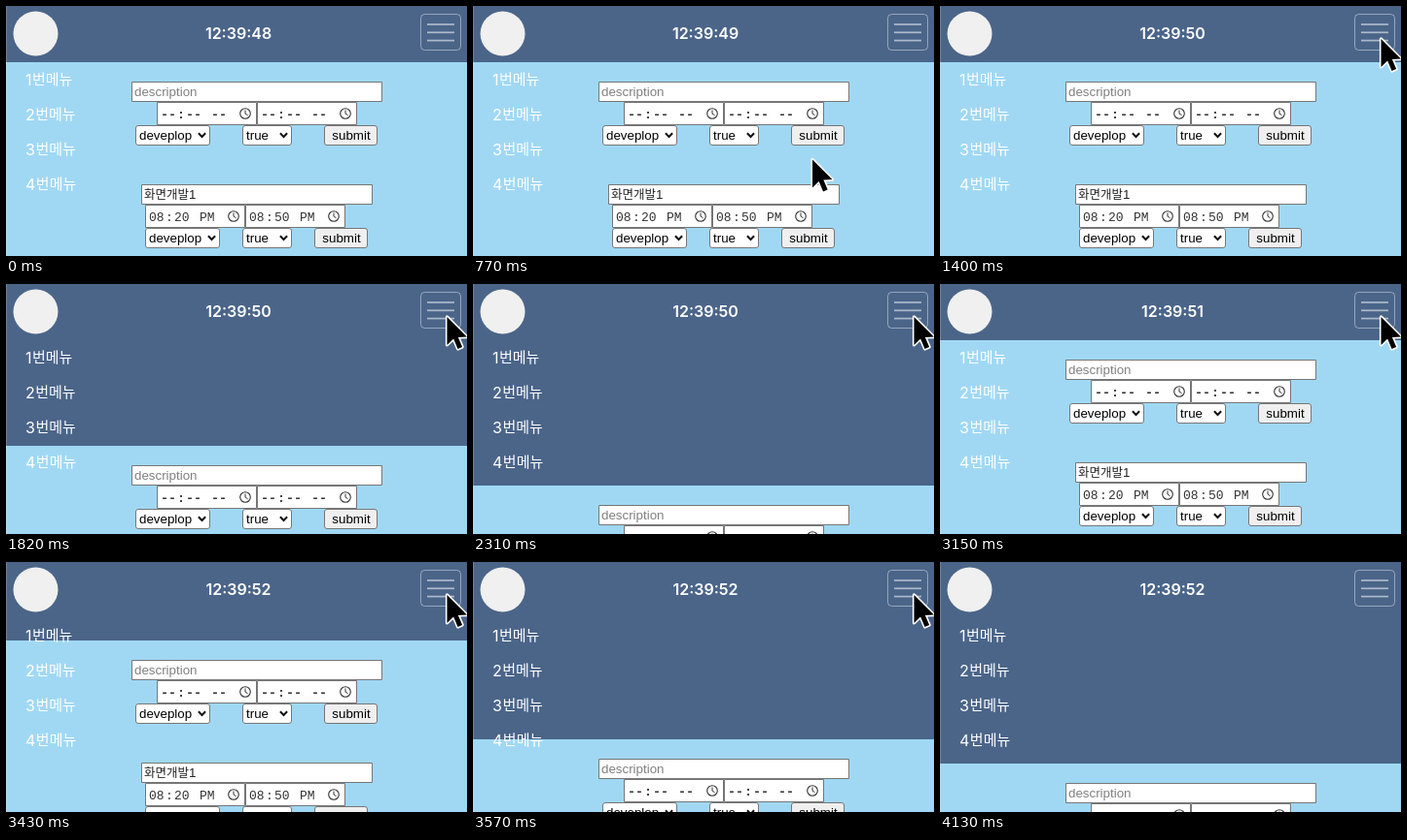
Recreate the animation shown at these times as an HTML page with a canvas. Size 474 by 258 pixels, loop 4410 ms.

```html
<!DOCTYPE html>
<html lang="ko">
<head>
<meta charset="utf-8">
<title>Menu toggle</title>
<style>
html, body { margin: 0; width: 100%; height: 100%; overflow: hidden; background: #a0d8f4; }
canvas { display: block; }
</style>
</head>
<body>
<canvas id="stage" width="474" height="258"></canvas>
<script>
const ctx = document.getElementById('stage').getContext('2d');
const W = 474, H = 258, LOOP = 4410, TICK = 70;
const BAR = 58, MENU = 150, SLIDE = 350;

const ARIAL = '13.33px "Liberation Sans", Arial, sans-serif';
const MONO = '"Liberation Mono", monospace';
const HANGUL = '"Noto Sans CJK KR", "Noto Sans CJK", sans-serif';
const LATIN = 'Inter, sans-serif';

// start time of each slide, and the openness it leads to
const SLIDES = [[1668, 1], [2545, 0], [3383, 1]];
const SECONDS = [350, 1400, 2380, 3360];
const PATH = [
  [560, 307, 241], [840, 363, 131], [1050, 397, 67],
  [1260, 453.5, 34], [3920, 453.5, 34], [4060, 473, 51]
];

// cubic-bezier(.25, .1, .25, 1)
function ease(x) {
  if (x <= 0) return 0;
  if (x >= 1) return 1;
  let lo = 0, hi = 1, u = 0.5;
  for (let i = 0; i < 24; i++) {
    u = (lo + hi) / 2;
    const bx = 0.75 * u * (1 - u) + u ** 3;
    if (bx < x) lo = u; else hi = u;
  }
  return 0.3 * u * (1 - u) ** 2 + 3 * u * u * (1 - u) + u ** 3;
}

function openness(t) {
  let open = 0;
  for (const [start, goal] of SLIDES) {
    open += (goal - open) * ease((t - start) / SLIDE);
  }
  return open;
}

function pointer(t) {
  if (t < PATH[0][0] || t > PATH[PATH.length - 1][0]) return null;
  for (let i = 1; i < PATH.length; i++) {
    const [t0, x0, y0] = PATH[i - 1], [t1, x1, y1] = PATH[i];
    if (t <= t1) {
      const k = (t - t0) / (t1 - t0);
      return [x0 + (x1 - x0) * k, y0 + (y1 - y0) * k];
    }
  }
}

function text(str, x, y, font, color = '#000', align = 'left') {
  ctx.font = font;
  ctx.fillStyle = color;
  ctx.textAlign = align;
  ctx.fillText(str, x, y);
}

function box(x, y, w, h, radius = 0, fill = '#fff', stroke = '#767676') {
  ctx.beginPath();
  ctx.roundRect(x + 0.5, y + 0.5, w - 1, h - 1, radius);
  ctx.fillStyle = fill;
  ctx.fill();
  ctx.strokeStyle = stroke;
  ctx.lineWidth = 1;
  ctx.stroke();
}

function line(points, width, color) {
  ctx.beginPath();
  points.forEach(([x, y]) => ctx.lineTo(x, y));
  ctx.lineWidth = width;
  ctx.strokeStyle = color;
  ctx.stroke();
}

function timeField(x, y, [hour, minute, half], style) {
  box(x, y, 103, 24);
  const font = style + ' ' + MONO, base = y + 16.5, ink = '#333';
  text(hour, x + 4, base, font, ink);
  text(':', x + 21, base, font, ink);
  text(minute, x + 30, base, font, ink);
  text(half, x + 56, base, font, ink);
  const cx = x + 91, cy = y + 12;
  ctx.beginPath();
  ctx.arc(cx, cy, 5.3, 0, Math.PI * 2);
  ctx.lineWidth = 1.1;
  ctx.strokeStyle = ink;
  ctx.stroke();
  line([[cx, cy - 3.5], [cx, cy], [cx + 2.6, cy + 1.8]], 1, ink);
}

function select(x, y, w, label) {
  box(x, y, w, 21, 2.5);
  text(label, x + 4, y + 15, ARIAL);
  const cx = x + w - 8.5, cy = y + 10;
  line([[cx - 3.6, cy - 1.8], [cx, cy + 2], [cx + 3.6, cy - 1.8]], 2, '#111');
}

function controls(x, y, submitX) {
  select(x, y, 77, 'deveplop');
  select(243, y, 51, 'true');
  box(submitX, y, 55, 21, 2.5, '#efefef');
  text('submit', submitX + 28, y + 15, ARIAL, '#000', 'center');
}

function forms(dy) {
  const empty = ['--', '--', '--'], blank = 'bold 13.33px', filled = '13px';
  let y = 78 + dy;
  box(129, y, 258, 21);
  text('description', 132, y + 15, ARIAL, '#808080');
  timeField(155, y + 21, empty, blank);
  timeField(258, y + 21, empty, blank);
  controls(133, y + 45, 327);

  y = 184 + dy;
  box(139, y, 238, 21);
  text('화면개발', 142, y + 15, '12.5px ' + HANGUL, '#222');
  text('1', 188, y + 15, ARIAL, '#222');
  timeField(143, y + 21, ['08', '20', 'PM'], filled);
  timeField(246, y + 21, ['08', '50', 'PM'], filled);
  controls(143, y + 45, 317);
}

function header(t, height) {
  ctx.fillStyle = '#4b6589';
  ctx.fillRect(0, 0, W, height);

  ctx.beginPath();
  ctx.arc(30.5, 28.5, 23, 0, Math.PI * 2);
  ctx.fillStyle = '#f0f0f0';
  ctx.fill();

  const sec = 48 + SECONDS.filter(s => t >= s).length;
  text('12:39:' + sec, 239, 34, '600 16px ' + LATIN, '#fff', 'center');

  box(426, 8, 42, 38, 4, 'transparent', 'rgba(255,255,255,.42)');
  for (const y of [19, 27.3, 35.6]) {
    line([[433, y], [461, y]], 1.7, 'rgba(255,255,255,.55)');
  }

  for (let i = 0; i < 4; i++) {
    const y = 81.5 + 36 * i, digit = String(i + 1);
    text(digit, 20, y, '16px ' + LATIN, '#fff');
    const w = ctx.measureText(digit).width;
    text('번메뉴', 20.5 + w, y - 0.5, '15px ' + HANGUL, '#fff');
  }
}

function arrow([x, y]) {
  const shape = [[0, 0], [0, 17], [3.9, 13.3], [6.5, 19.4], [9.2, 18.2], [6.7, 12.3], [12, 12.1]];
  ctx.beginPath();
  shape.forEach(([px, py]) => ctx.lineTo(x + px * 1.7, y + py * 1.7));
  ctx.closePath();
  ctx.lineJoin = 'round';
  ctx.lineWidth = 3.2;
  ctx.strokeStyle = '#fff';
  ctx.stroke();
  ctx.fillStyle = '#000';
  ctx.fill();
  ctx.lineJoin = 'miter';
}

function draw(t) {
  const drop = Math.round(MENU * openness(t));
  ctx.fillStyle = '#a0d8f4';
  ctx.fillRect(0, 0, W, H);
  forms(drop);
  header(t, BAR + drop);
  ctx.fillStyle = 'rgba(255,255,255,.2)';
  ctx.fillRect(0, 0, 1, H);
  const tip = pointer(t);
  if (tip) arrow(tip);
}

// the picture advances in even ticks
const begin = performance.now();
function frame() {
  const t = (performance.now() - begin) % LOOP;
  draw(Math.floor(t / TICK) * TICK);
  requestAnimationFrame(frame);
}
frame();
</script>
</body>
</html>
```
